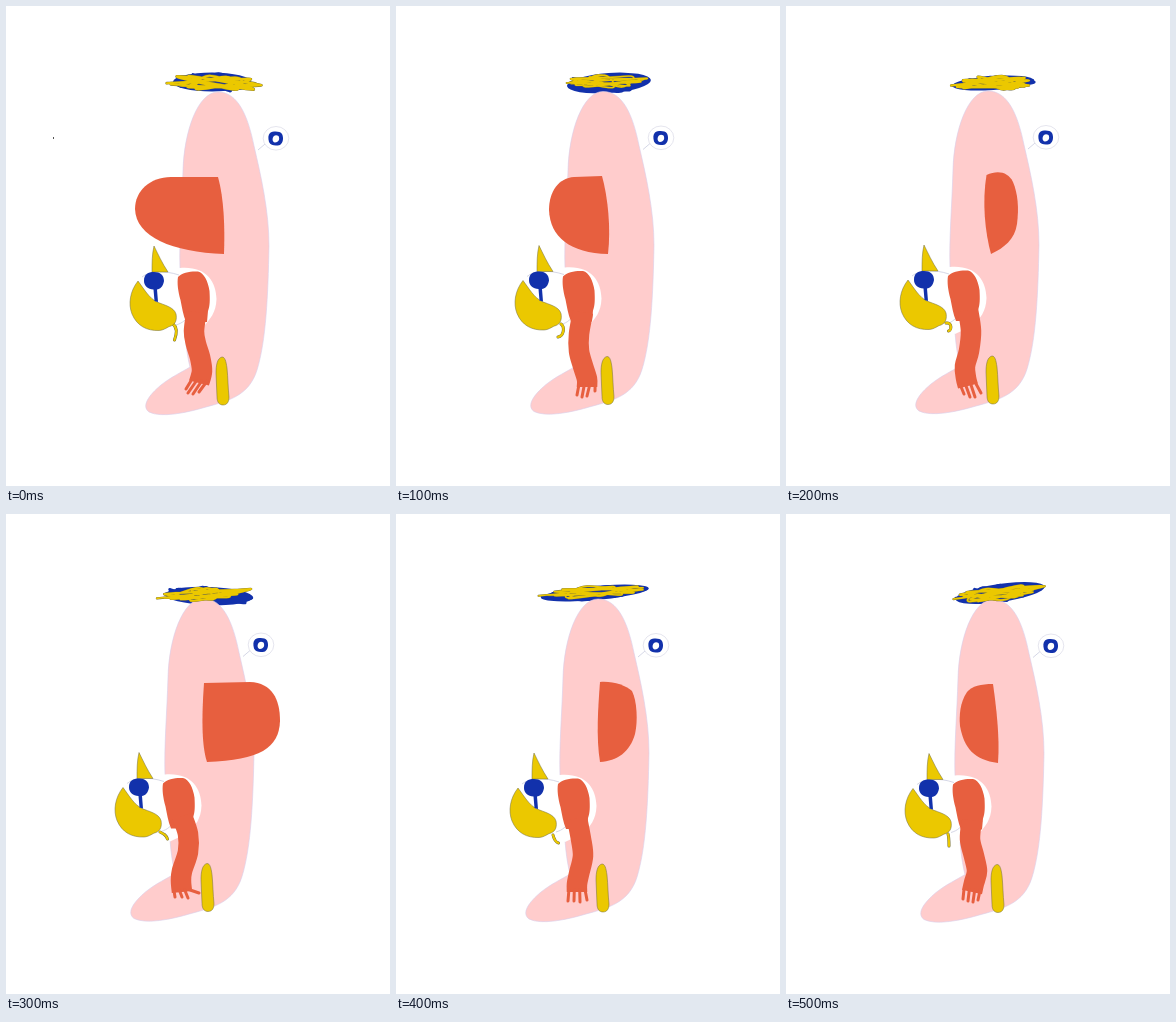
Animation of 384x480 px, one loop 0.6 s. Source, as an HTML page:

```html
<!DOCTYPE html>
<html lang="en">
<head>
<meta charset="utf-8">
<title>Swaying figure</title>
<style>
html, body { margin: 0; width: 100%; height: 100%; overflow: hidden; background: #fff; }
svg { display: block; width: 100vw; height: 100vh; }
.pink { fill: #ffcccc; stroke: #d9cdea; stroke-width: .6; }
.red { fill: #e75f3f; }
.yellow { fill: #ebc800; }
.blue { fill: #1231ab; }
.inked { stroke: #6f6a3c; stroke-width: .5; }
.hair { fill: none; stroke: #b9bcd6; stroke-width: .6; }
.line { fill: none; stroke-linecap: round; stroke-linejoin: round; }
</style>
</head>
<body>
<svg viewBox="0 0 384 480">
  <g id="hatBack">
    <ellipse id="brim" class="blue"/>
    <path id="tangle" class="line" stroke="#1231ab" stroke-width="3"/>
  </g>
  <g class="sway">
    <path class="pink" d="M212 86C232 86 242 110 248 140C255 170 263 205 263 240C262 290 260 335 251 364C243 390 222 395 200 401C180 407 155 412 143 406C135 400 143 389 155 379C165 371 176 366 184 361C180 345 179 330 178 310L174 262C173 235 176 200 177 165C178 125 192 86 212 86Z"/>
    <path class="hair" d="M252 144L259 138"/>
    <ellipse cx="270" cy="132.3" rx="12.8" ry="11.8" fill="#fff" stroke="#d3d3e2" stroke-width=".6"/>
    <path class="blue" fill-rule="evenodd" d="M264 127C267 125 274 125 276 128C278 132 277 137 274 139C270 140 265 140 263 136C262 132 262 129 264 127ZM268 130C266 132 266 136 269 136.500C273 136 274 133 272.500 130C271 129 269 129 268 130Z"/>
  </g>
  <path id="nose" class="red"/>
  <g class="sway">
    <path fill="#fff" d="M133 275C140 265 155 263 174 262C200 260 210 275 210.500 293C210 307 204 313 198 320L179 329L168 322L150 310Z"/>
    <path class="hair" d="M136 271C143 265 158 264 173 269M170 319C173 318 176 317 179 314"/>
    <path class="yellow inked" d="M148 240C146 248 146 257 146 266L162 266C156 257 152 248 148 240Z"/>
  </g>
  <path id="dripInk" class="line" stroke="#6f6a3c" stroke-width="3"/>
  <path id="drip" class="line" stroke="#ebc800" stroke-width="2.2"/>
  <g class="sway">
    <path class="yellow inked" d="M132 275C124 285 122 298 126 308C131 320 141 325 153 324.500C159 324 161 321 165 320C170 318 171 313 170 308C168 301 158 299 151 296C143 292 138 283 132 275Z"/>
    <path class="blue" d="M138 275C138 268 142 266 148 266C154 266 158 269 158 275C157 281 154 283 151 283.500L152 296L148.500 295L147.500 283.500C142 283 138 280 138 275Z"/>
    <path class="red" d="M172 271C176 266 186 265 192 265.500C198 267 202 275 203.500 285C204 294 204 300 202 305L201 316L180 316C177 309 176 301 174.500 294C172 285 171 277 172 271Z"/>
  </g>
  <path id="arm" class="line" stroke="#e75f3f" stroke-width="20.5" style="stroke-linecap:butt"/>
  <path id="fingers" class="line" stroke="#e75f3f" stroke-width="3"/>
  <g class="sway">
    <path class="yellow inked" d="M216 351C211 352 210 360 210 367L211 391C211 397 214 399 217 399C221 399 223 396 223 391C222 382 222 372 221 362C220 355 219 351 216 351Z"/>
  </g>
  <path id="strawInk" class="line" stroke="#6f6a3c"/>
  <path id="straw" class="line" stroke="#ebc800"/>
  <rect id="speck" x="47" y="131" width="1" height="2" fill="#555"/>
</svg>
<script>
const STEP = 100;

// brim and straw: centre x, centre y, radius x, radius y, tilt
const poses = [
  {
    nose: "M212 171L165 171C144 171 129 185 129 203C130 231 166 246 218 248C219 222 218 192 212 171Z",
    arm: [[190.5, 306], [188, 325], [190, 338], [194, 351], [196, 365], [193, 377]],
    tips: [[180, 383], [182, 387], [187, 388], [193, 386]],
    drip: "M167 318C171 321 171 327 168.500 334",
    brim: [206, 76, 39, 9.5, 0], straw: [209, 77, 51, 9, 0], weight: 2.1
  },
  {
    nose: "M206 170L178 171C163 172 153 185 153 204C154 231 174 247 212 248C215 222 212 192 206 170Z",
    arm: [[187, 306], [183, 328], [183, 345], [187, 360], [191, 373], [191, 381]],
    tips: [[181, 389], [186, 391], [191, 390], [199, 385]],
    drip: "M165 318C169 321 168 330 162 331",
    brim: [213, 77, 42, 10, -4], straw: [212, 75, 43, 7, -3], weight: 1.4
  },
  {
    nose: "M200.500 169C212 164 222 166 227 176C232 188 233 202 231 218C229 233 218 242 205 248C199 226 196 196 200.500 169Z",
    arm: [[182, 304], [185, 325], [183, 345], [179, 360], [180, 372], [182, 380]],
    tips: [[178, 388], [184, 391], [189, 391], [195, 387]],
    drip: "M160 317C166 316 166 324 162.500 325",
    brim: [207, 77, 41, 7, -4], straw: [207, 77, 43, 8, -4], weight: 2
  },
  {
    nose: "M198 169L244 168C266 169 274 185 274 207C273 234 254 246 201 248C195 230 196 198 198 169Z",
    arm: [[176, 302], [182, 320], [182, 338], [176, 357], [175, 367], [176, 378]],
    tips: [[169, 383], [176, 383], [182, 384], [193, 379]],
    drip: "M154 318C158 320 160 321 161.500 325",
    brim: [203, 82, 44, 9, 2], straw: [199, 80, 49, 7, -6], weight: 1.7
  },
  {
    nose: "M204 168C217 167 229 171 236 177C241 187 242 207 239 220C234 238 221 247 204 248C200 223 202 195 204 168Z",
    arm: [[181, 304], [185, 325], [187, 342], [183, 360], [181, 370], [181, 378]],
    tips: [[172, 387], [178, 387], [184, 388], [191, 386]],
    drip: "M157 321C158 325 159 328 162.500 329",
    brim: [199, 79, 54, 7, -5], straw: [198, 78, 56, 6.5, -5], weight: 1.4
  },
  {
    nose: "M207 170C195 170 186 172 181 178C174 188 173 202 174 212C178 234 188 246 212 249C214 222 210 192 207 170Z",
    arm: [[186, 306], [184, 325], [188, 342], [191, 357], [188, 369], [186, 378]],
    tips: [[177, 385], [182, 387], [187, 388], [192, 386]],
    drip: "M162 320C163 323 163 328 163 332",
    brim: [214, 79, 45, 9, -8], straw: [214, 79, 47, 8, -9], weight: 1.7
  }
];

const el = id => document.getElementById(id);
const set = (id, attrs) => {
  for (const key in attrs) el(id).setAttribute(key, attrs[key]);
};

function spline(pts) {
  let d = "M" + pts[0];
  for (let i = 0; i < pts.length - 1; i++) {
    const a = pts[i - 1] || pts[i], b = pts[i], c = pts[i + 1], e = pts[i + 2] || c;
    const p = [0, 1].map(k => b[k] + (c[k] - a[k]) / 6);
    const q = [0, 1].map(k => c[k] - (e[k] - b[k]) / 6);
    d += `C${p} ${q} ${c}`;
  }
  return d;
}

function seeded(seed) {
  return () => {
    seed = (seed * 16807) % 2147483647;
    return seed / 2147483647;
  };
}

// Long loops thrown from side to side inside a tilted ellipse
function scribble([cx, cy, rx, ry, tilt], turns, seed) {
  const rnd = seeded(seed), t = tilt * Math.PI / 180, pts = [];
  for (let k = 0; k < turns; k++) {
    const a = Math.PI * (1 + k * .82) + (rnd() - .5) * .7;
    const x = Math.cos(a) * rx * (k < 3 ? 1 : .7 + .3 * rnd());
    const y = Math.sin(a + .3) * ry * (.7 + .3 * rnd());
    pts.push([cx + x * Math.cos(t) - y * Math.sin(t), cy + x * Math.sin(t) + y * Math.cos(t)]);
  }
  return spline(pts);
}

function fingers({ arm, tips }) {
  const [x, y] = arm[arm.length - 1];
  return tips.map((tip, k) => `M${x + (k - 1.5) * 5.4} ${y - 2}L${tip}`).join("");
}

poses.forEach((p, i) => {
  p.strawPath = scribble(p.straw, 18, 4177 + i * 9241);
  p.tanglePath = scribble(p.brim, 11, 7013 + i * 5119);
});

let shown = -1;
function draw(ms) {
  const i = Math.floor(ms / STEP) % poses.length;
  if (i === shown) return;
  shown = i;
  const p = poses[i], lean = 3 - Math.abs(3 - i);
  document.querySelectorAll(".sway").forEach(g =>
    g.setAttribute("transform", `translate(${-5 * lean} ${-.5 * lean})`));
  const [cx, cy, rx, ry, tilt] = p.brim;
  set("brim", { cx, cy, rx, ry, transform: `rotate(${tilt} ${cx} ${cy})` });
  set("tangle", { d: p.tanglePath });
  set("strawInk", { d: p.strawPath, "stroke-width": p.weight + .6 });
  set("straw", { d: p.strawPath, "stroke-width": p.weight });
  set("nose", { d: p.nose });
  set("arm", { d: spline(p.arm) });
  set("fingers", { d: fingers(p) });
  set("dripInk", { d: p.drip });
  set("drip", { d: p.drip });
  set("speck", { visibility: i ? "hidden" : "visible" });
}

function tick() {
  draw(performance.now());
  requestAnimationFrame(tick);
}
tick();
</script>
</body>
</html>
```
